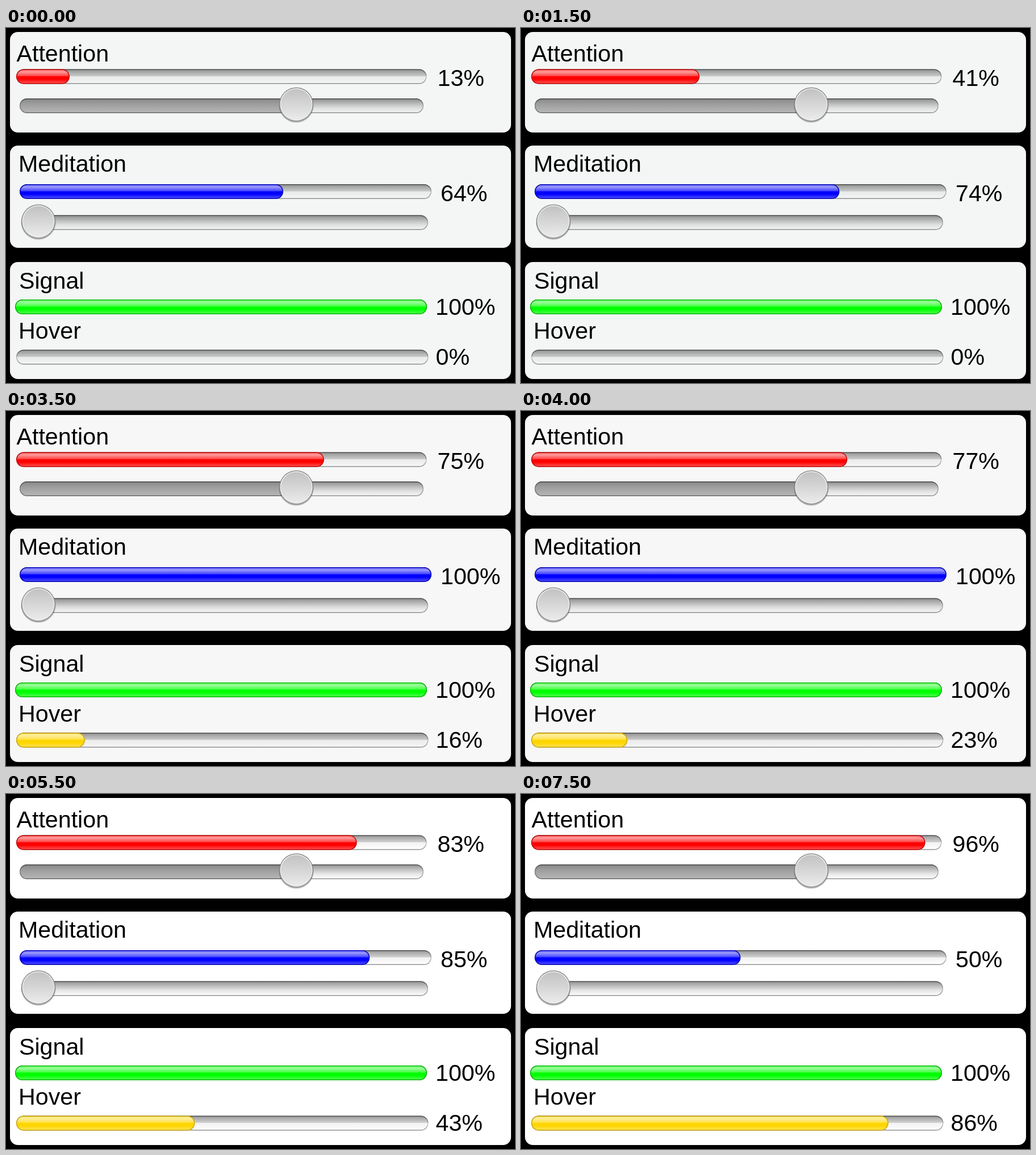
An HTML page for the animation above (8000 ms loop, 896x625 px).

```html
<!DOCTYPE html>
<html lang="en">
<head>
<meta charset="utf-8">
<title>Focus meters</title>
<style>
  html, body { margin: 0; width: 100%; height: 100%; overflow: hidden; background: #000; }
  svg { display: block; width: 100vw; height: 100vh; }
  text { font: 41.2px "Liberation Sans", Arial, sans-serif; fill: #000; }
</style>
</head>
<body>
<svg id="stage" viewBox="0 0 896 625">
  <defs>
    <linearGradient id="groove" x2="0" y2="1">
      <stop offset="0" stop-opacity=".43"/>
      <stop offset=".2" stop-opacity=".31"/>
      <stop offset=".47" stop-opacity=".18"/>
      <stop offset=".5" stop-opacity=".05"/>
      <stop offset="1" stop-opacity="0"/>
    </linearGradient>
    <linearGradient id="rim" x2="0" y2="1">
      <stop offset="0" stop-opacity=".48"/>
      <stop offset=".5" stop-opacity=".18"/>
      <stop offset="1" stop-opacity=".42"/>
    </linearGradient>
    <linearGradient id="gloss" x2="0" y2="1">
      <stop offset="0" stop-color="#fff" stop-opacity=".45"/>
      <stop offset=".15" stop-color="#fff" stop-opacity=".6"/>
      <stop offset=".46" stop-color="#fff" stop-opacity=".26"/>
      <stop offset=".5" stop-color="#fff" stop-opacity="0"/>
      <stop offset=".7" stop-color="#fff" stop-opacity="0"/>
      <stop offset="1" stop-color="#fff" stop-opacity=".3"/>
    </linearGradient>
    <linearGradient id="slot" x2="0" y2="1">
      <stop offset="0" stop-opacity=".44"/>
      <stop offset=".3" stop-opacity=".27"/>
      <stop offset=".65" stop-opacity=".09"/>
      <stop offset="1" stop-opacity="0"/>
    </linearGradient>
    <linearGradient id="slotFill" x2="0" y2="1">
      <stop offset="0" stop-color="#858585"/>
      <stop offset=".35" stop-color="#9c9c9c"/>
      <stop offset="1" stop-color="#b8b8b8"/>
    </linearGradient>
    <linearGradient id="knob" x2="0" y2="1">
      <stop offset="0" stop-color="#c2c2c2"/>
      <stop offset="1" stop-color="#ebebeb"/>
    </linearGradient>
  </defs>
</svg>
<script>
const STEP = 500;
const attention = [13, 22, 31, 41, 49, 57, 66, 75, 77, 78, 80, 83, 85, 88, 92, 96];
const meditation = [64, 67, 70, 74, 82, 90, 96, 100, 100, 100, 93, 85, 77, 69, 60, 50];
const stage = document.getElementById("stage");

function add(tag, attrs, text = "") {
  const node = document.createElementNS("http://www.w3.org/2000/svg", tag);
  for (const key in attrs) node.setAttribute(key, attrs[key]);
  node.textContent = text;
  stage.append(node);
  return node;
}

const pill = (x, y, width, height, attrs) =>
  add("rect", { x, y, width, height, rx: height / 2, ...attrs });

const label = (x, y, text) => add("text", { x, y }, text);

const panels = [[7, 177], [207, 180], [412, 206]].map(([y, height]) =>
  add("rect", { x: 7, y, width: 882, height, rx: 14 }));

function meter(x, y, width, color, edge, textX, textY) {
  pill(x, y, width, 26, { fill: "url(#groove)" });
  pill(x + .75, y + .75, width - 1.5, 24.5, { fill: "none", stroke: "url(#rim)", "stroke-width": 1.5 });
  const fill = [
    pill(x, y, 0, 26, { fill: edge }),
    pill(x + 1.5, y + 1.5, 0, 23, { fill: color }),
    pill(x + 1.5, y + 1.5, 0, 23, { fill: "url(#gloss)" })
  ];
  const value = label(textX, textY, "");
  return percent => {
    const length = width * percent / 100;
    fill.forEach((node, i) => {
      node.setAttribute("width", Math.max(0, length - (i ? 3 : 0)));
      node.setAttribute("visibility", percent > 0 ? "visible" : "hidden");
    });
    value.textContent = Math.floor(percent) + "%";
  };
}

function slider(x, y, width, knobX, knobY) {
  pill(x, y, width, 26, { fill: "url(#slot)" });
  pill(x, y, knobX - x, 26, { fill: "url(#slotFill)" });
  pill(x + .75, y + .75, width - 1.5, 24.5, { fill: "none", stroke: "url(#rim)", "stroke-width": 1.5 });
  const disc = (dy, r, attrs) => add("circle", { cx: knobX, cy: knobY + dy, r, ...attrs });
  disc(1.5, 30.5, { fill: "#000", opacity: .28 });
  disc(0, 30, { fill: "#8e8e8e" });
  disc(0, 28.5, { fill: "#f2f2f2" });
  disc(.3, 27.3, { fill: "url(#knob)" });
}

label(18.5, 59, "Attention");
label(22, 253, "Meditation");
label(23, 459, "Signal");
label(22, 547, "Hover");

const setAttention = meter(18, 72.5, 722.5, "#f00", "#c80000", 759.5, 102);
slider(24, 124, 711, 511, 134.5);
const setMeditation = meter(24, 275, 725, "#00f", "#0000b4", 765, 305);
slider(27, 329.5, 716, 57, 340.5);
const setSignal = meter(16, 478, 725, "#0f0", "#00b800", 756, 505);
const setHover = meter(18, 566.5, 725.5, "#ffd500", "#d0a800", 756.5, 593);
setSignal(100);

function render(time) {
  const step = Math.floor(time / STEP) % attention.length;
  const background = step < 6 ? "#f4f6f6" : step < 11 ? "#f7f7f7" : "#fff";
  panels.forEach(panel => panel.setAttribute("fill", background));
  setAttention(attention[step]);
  setMeditation(meditation[step]);
  // Hovering starts once attention passes 70 percent.
  setHover(Math.max(0, (attention[step] - 70) * 10 / 3));
}

const start = performance.now();
function tick() {
  render(performance.now() - start);
  requestAnimationFrame(tick);
}
tick();
</script>
</body>
</html>
```
